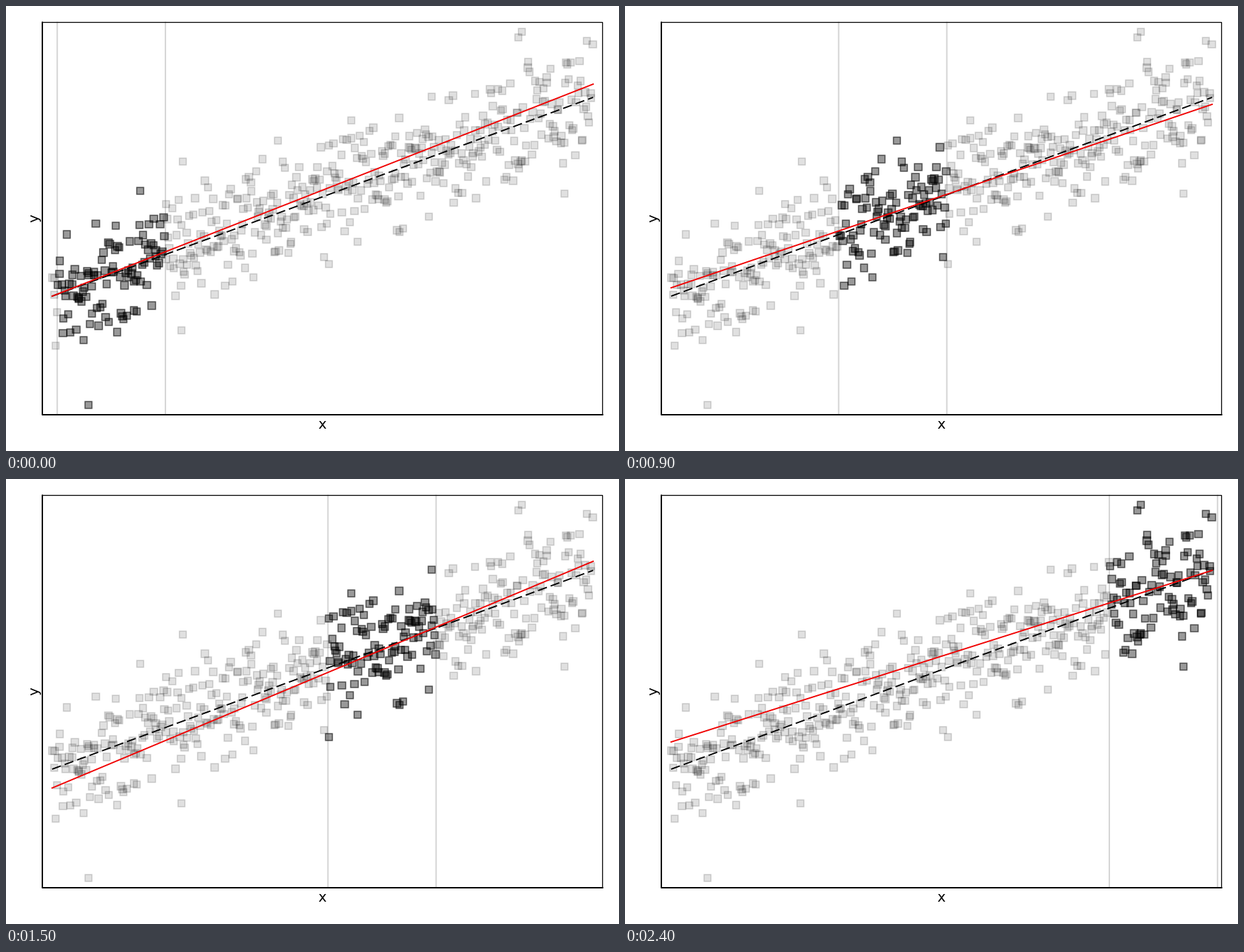
Animation, 877 px wide and 638 px high, one loop 4.4 s. Source, as a matplotlib script:

```python
import numpy as np
import matplotlib.pyplot as plt
from matplotlib.animation import FuncAnimation
from matplotlib.patches import Rectangle

W, H, DPI = 877, 638, 100
PX = 72 / DPI                      # one pixel in points
LEFT, RIGHT, TOP, BOTTOM = 52, 853.5, 23.5, 586
X0, X1 = 66, 840                   # data range
TREND = (416, 131)                 # heights of the overall fit at X0 and X1
START, SPAN, STEP = 73.3, 154.8, 77.45
TICK, HOLD, TICKS = 100, 3, 44

# Heights of the local fit at X0 and X1, one per window
FITS = [(416, 112), (402, 182), (430, 100), (404, 141), (379, 168),
        (443, 118), (391, 145), (466, 118), (377, 131)]

# The most striking outliers
OUTLIERS = [(118, 572), (251, 465), (253, 223), (192, 265), (389, 193),
            (494, 164), (462, 370), (563, 324), (609, 130), (733, 45),
            (738, 37), (799, 269)]


def make_points(n=490, spread=44, limit=88):
    """Evenly spread x with truncated normal noise around the trend."""
    rng = np.random.default_rng(12)
    x = X0 + (X1 - X0) * (np.arange(n) + rng.random(n)) / n
    noise = rng.normal(0, spread, 2 * n)
    noise = noise[np.abs(noise) < limit][:n]
    y = np.interp(x, (X0, X1), TREND) + noise
    pts = np.vstack([np.column_stack([x, y]), OUTLIERS])
    return rng.permutation(pts)


points = make_points()

fig = plt.figure(figsize=(W / 100, H / 100), dpi=DPI, facecolor="white")
ax = fig.add_axes([0, 0, 1, 1])
ax.set(xlim=(0, W), ylim=(H, 0))
ax.axis("off")


def line(xs, ys, color, width, z, **kw):
    return ax.plot(xs, ys, color=color, lw=width * PX, zorder=z,
                   snap=False, **kw)[0]


def black(alpha):
    """One black RGBA row per alpha value."""
    return np.column_stack([np.zeros((len(alpha), 3)), alpha])


edges = [line([0, 0], [TOP, BOTTOM], "#d3d3d3", 1.9, 1) for _ in range(2)]
dots = ax.scatter(points[:, 0], points[:, 1], marker="s",
                  s=(10.4 * PX) ** 2, linewidths=1.8 * PX, zorder=2)
line([X0, X1], TREND, "black", 1.9, 3, dashes=(7, 3), dash_capstyle="butt")
fit = line([X0, X1], FITS[0], "#f00000", 1.9, 4)

ax.add_patch(Rectangle((LEFT, TOP), RIGHT - LEFT, BOTTOM - TOP, fill=False,
                       ec="black", lw=1.3 * PX, zorder=5, snap=False))
line([LEFT, LEFT, RIGHT], [TOP, BOTTOM, BOTTOM], "black", 2, 5)

label = dict(family="DejaVu Sans", size=20 * PX, color="black",
             ha="center", va="center")
ax.text(452.5, 600, "x", **label)
ax.text(41, 304.5, "y", rotation=90, **label)


def update(i):
    k = min(i // HOLD, len(FITS) - 1)
    lo = START + k * STEP
    hi = lo + SPAN
    for edge, x in zip(edges, (lo, hi)):
        edge.set_xdata([x, x])
    inside = (points[:, 0] >= lo) & (points[:, 0] <= hi)
    dots.set_facecolor(black(np.where(inside, 0.4, 0.12)))
    dots.set_edgecolor(black(np.where(inside, 0.5, 0.13)))
    fit.set_ydata(FITS[k])
    return [*edges, dots, fit]


anim = FuncAnimation(fig, update, frames=TICKS, interval=TICK,
                     repeat=True, repeat_delay=0, blit=False)
plt.show()
```
